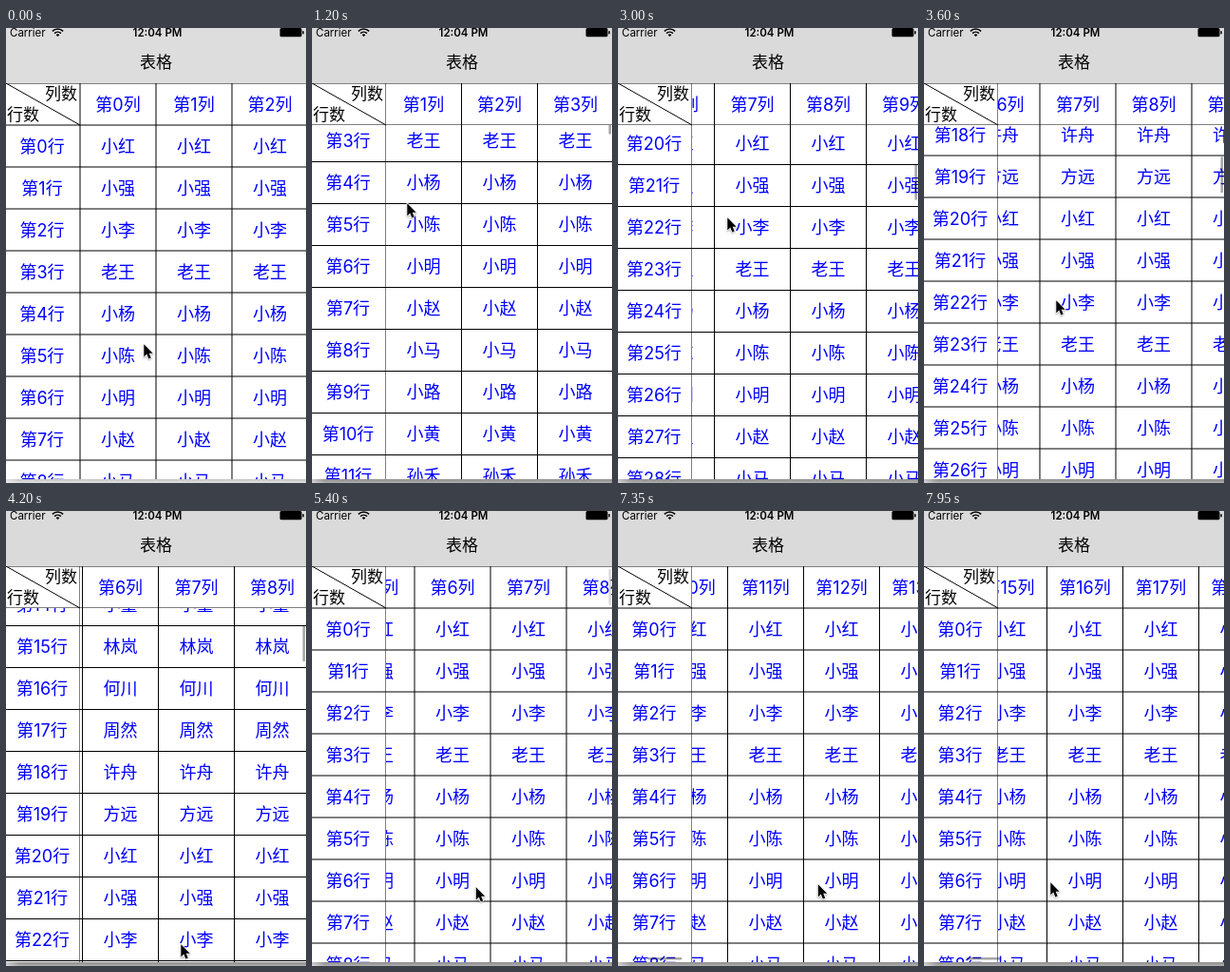
Write an HTML page with a canvas that moves like this. It is 316 px wide and 478 px high and loops after 8000 ms.

```html
<!DOCTYPE html>
<html lang="zh">
<head>
<meta charset="utf-8">
<style>
html, body { margin: 0; width: 100%; height: 100%; overflow: hidden; background: #fff; }
canvas { display: block; width: 316px; height: 478px; }
</style>
</head>
<body>
<canvas id="stage" width="316" height="478"></canvas>
<script>
const ctx = document.getElementById('stage').getContext('2d');
const W = 316, LOOP = 8000, STEP = 150;
const TOP = 58, BODY = 102, BOTTOM = 474, LEFT = 78, ROW = 44, COL = 80;
const FONT = 'Inter, "Noto Sans CJK SC", "Noto Sans CJK", sans-serif';
const NAMES = ('小红 小强 小李 老王 小杨 小陈 小明 小赵 小马 小路 ' +
  '小黄 孙禾 小周 小刘 小董 林岚 何川 周然 许舟 方远').split(' ');

// Easings for the segment that ends at a key
const linear = u => u;
const fling = u => (1 - Math.exp(-2.1 * u)) / (1 - Math.exp(-2.1));
const drag = u => u * (0.55 + 0.45 * u);
const smooth = u => u * u * (3 - 2 * u);

// Keys: time, x, y, easing
const SCROLL = [
  [0, 0, 0], [1050, 0, 0], [1200, 80.5, 137.5], [2250, 492, 810.5, fling],
  [3000, 536.5, 882.5, smooth], [3150, 534, 880], [4200, 477.5, 641.5, drag],
  [5250, 450, 0, fling], [5700, 450, 0], [6600, 495, 0], [6750, 505, 0],
  [6900, 560, 0], [7800, 1125, 0], [7950, 1228.5, 0]
];
const POINTER = [
  [0, 145, 331], [450, 165, 268, smooth], [1050, 188, 322, smooth],
  [1200, 100, 183], [1350, 92, 166], [2250, 143, 287, smooth],
  [3000, 115, 198, smooth], [3150, 118, 206], [4200, 184, 454, drag],
  [4500, 196, 456], [5250, 142, 394, smooth], [5550, 203, 394],
  [5850, 203, 394], [6600, 148, 394], [6900, 62, 392],
  [7500, 238, 391, smooth], [7800, 234, 390], [7950, 133, 389]
];

// Positions snap to half points, as on a retina screen
const snap = v => Math.round(v * 2) / 2;

function track(keys, t) {
  const next = keys.findIndex(k => k[0] > t);
  if (next < 0) return keys[keys.length - 1].slice(1, 3);
  const a = keys[next - 1], b = keys[next];
  const u = (b[3] || linear)((t - a[0]) / (b[0] - a[0]));
  return [1, 2].map(i => snap(a[i] + (b[i] - a[i]) * u));
}

function rect(x, y, w, h, color) {
  ctx.fillStyle = color;
  ctx.fillRect(x, y, w, h);
}

function text(str, x, baseline, size, color = '#000', weight = 400, align = 'center') {
  ctx.font = `${weight} ${size}px ${FONT}`;
  ctx.textAlign = align;
  ctx.fillStyle = color;
  ctx.fillText(str, x, baseline);
}

const label = (str, x, middle) => text(str, x, middle + 6.8, 18, '#00f');

function clipped(x, y, w, h, draw) {
  ctx.save();
  ctx.beginPath();
  ctx.rect(x, y, w, h);
  ctx.clip();
  draw();
  ctx.restore();
}

function bar(x, y, w, h, alpha) {
  ctx.fillStyle = `rgba(0,0,0,${alpha})`;
  ctx.beginPath();
  ctx.roundRect(x, y, w, h, 1.25);
  ctx.fill();
}

function drawTable(sx, sy, t) {
  const firstRow = Math.floor(sy / ROW), firstCol = Math.floor(sx / COL);
  const rows = Array.from({ length: 10 }, (_, i) => firstRow + i);
  const cols = Array.from({ length: 4 }, (_, i) => firstCol + i);
  const rowY = r => BODY + r * ROW - sy;
  const colX = c => LEFT + c * COL - sx;
  // Each line is two half-point cell borders meeting at the cell edge
  const rowLines = () => rows.forEach(r => rect(0, rowY(r) - 0.5, W, 1, '#000'));
  const colLines = () => cols.forEach(c => rect(colX(c) - 0.5, TOP, 1, BOTTOM - TOP, '#000'));

  clipped(LEFT, BODY, W - LEFT, BOTTOM - BODY, () => {
    for (const r of rows) {
      for (const c of cols) label(NAMES[r % NAMES.length], colX(c) + 40, rowY(r) + 22);
    }
    rowLines();
    colLines();
  });
  clipped(0, BODY, LEFT, BOTTOM - BODY, () => {
    for (const r of rows) label(`第${r}行`, 38, rowY(r) + 22);
    rowLines();
  });
  clipped(LEFT, TOP, W - LEFT, BODY - TOP, () => {
    for (const c of cols) label(`第${c}列`, colX(c) + 40, 80);
    colLines();
  });

  // Scroll indicators
  const fade = t < 1200 || t >= 5550 ? 0 : t >= 5400 ? 0.15 : 0.35;
  const clipTop = sy ? BODY : TOP;
  clipped(0, clipTop, W, BOTTOM - clipTop, () => {
    if (fade) bar(312.5, 61 + sy * 0.0925, 2.5, 38, fade);
    if (t >= 5850) bar(2.5 + sx * 0.0342, 469, 36, 2.5, 0.35);
  });

  // Corner cell and fixed borders
  rect(0, TOP, W, 0.5, '#000');
  rect(0, BODY - 0.5, W, 0.5, '#000');
  rect(LEFT - 0.5, TOP, 0.5, BOTTOM - TOP, '#000');
  ctx.strokeStyle = '#000';
  ctx.lineWidth = 1;
  ctx.beginPath();
  ctx.moveTo(0, TOP);
  ctx.lineTo(LEFT, BODY);
  ctx.stroke();
  text('列数', 58, 75, 17);
  text('行数', 18, 97, 17);
}

function drawBars(t) {
  const focused = t >= 600;
  rect(0, 0, W, TOP, focused ? '#dadada' : '#dddddd');
  text('Carrier', 4, 9, 11.5, '#000', 400, 'left');
  text('12:04 PM', 159.5, 9, 11.5, '#000', 600);
  text('表格', 158, 42, 17, '#000', 500);

  // Signal arcs
  ctx.strokeStyle = '#000';
  ctx.lineWidth = 1.6;
  for (const r of [4.8, 8]) {
    ctx.beginPath();
    ctx.arc(54.5, 9, r, -Math.PI * 0.75, -Math.PI * 0.25);
    ctx.stroke();
  }
  ctx.fillStyle = '#000';
  ctx.beginPath();
  ctx.moveTo(54.5, 9);
  ctx.arc(54.5, 9, 2.6, -Math.PI * 0.75, -Math.PI * 0.25);
  ctx.fill();

  // Battery
  ctx.beginPath();
  ctx.roundRect(288.5, 0, 23, 9.3, 1.5);
  ctx.roundRect(312.3, 3, 1.5, 3.5, 0.7);
  ctx.fill();

  // Window shadow under the screen
  const shade = ctx.createLinearGradient(0, BOTTOM, 0, 478);
  shade.addColorStop(0, focused ? '#8c8c8c' : '#c4c4c4');
  shade.addColorStop(1, focused ? '#b0b0b0' : '#e2e2e2');
  rect(0, BOTTOM, W, 4, shade);
  const corner = ctx.createLinearGradient(0, 0, 14, 0);
  corner.addColorStop(0, 'rgba(255,255,255,.5)');
  corner.addColorStop(1, 'rgba(255,255,255,0)');
  rect(0, BOTTOM, 14, 4, corner);
}

function drawPointer(x, y) {
  const arrow = new Path2D('M0 0V13.2L3 10.4L5 15.2L7.4 14.2L5.4 9.5H9.4Z');
  ctx.save();
  ctx.translate(x + 0.3, y + 1.2);
  ctx.lineJoin = 'round';
  ctx.lineWidth = 1.5;
  ctx.strokeStyle = '#fff';
  ctx.shadowColor = 'rgba(0,0,0,.35)';
  ctx.shadowBlur = 2;
  ctx.shadowOffsetY = 1;
  ctx.stroke(arrow);
  ctx.shadowColor = 'transparent';
  ctx.fillStyle = '#000';
  ctx.fill(arrow);
  ctx.restore();
}

function render(now) {
  const t = Math.floor((now % LOOP) / STEP) * STEP;
  rect(0, 0, W, 478, '#fff');
  drawTable(...track(SCROLL, t), t);
  drawBars(t);
  drawPointer(...track(POINTER, t));
}

const start = performance.now();
function tick() {
  render(performance.now() - start);
  requestAnimationFrame(tick);
}
tick();
</script>
</body>
</html>
```
